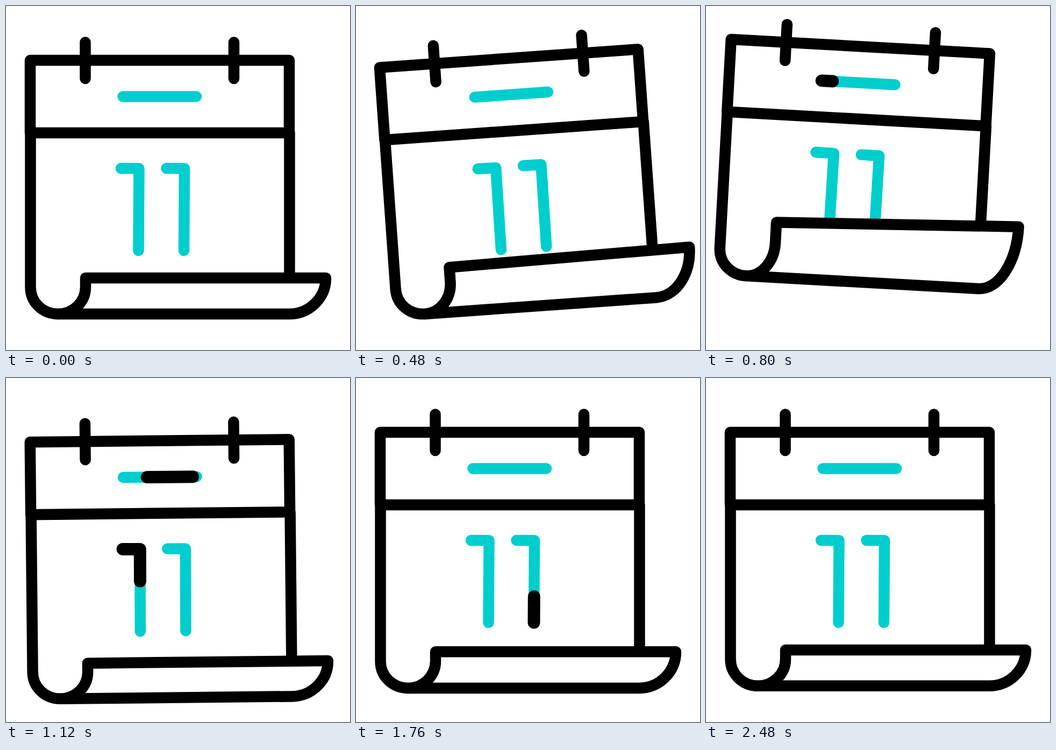
An HTML page for the animation above (2.88 s loop, 640x640 px).

```html
<!DOCTYPE html>
<html lang="en">
<head>
<meta charset="utf-8">
<title>Calendar</title>
<style>
  html, body { margin: 0; width: 100%; height: 100%; overflow: hidden; background: #fff; }
  svg { display: block; width: 100%; height: 100%; }
  path { fill: none; stroke: #000; stroke-width: 20.5; stroke-linecap: round; stroke-linejoin: round; }
  .teal { stroke: #00cece; }
  .pulse { stroke-width: 23; }
  #sheet { fill: #fff; }
</style>
</head>
<body>
<svg viewBox="0 0 640 640">
  <g id="page">
    <path d="M45 236V101H527V236M45 236H527"/>
    <path d="M147.5 67.5V135M424 67.5V135"/>
    <path id="sides"/>
    <g id="marks"></g>
    <path id="sheet"/>
  </g>
</svg>
<script>
const LOOP = 2880, END = 2480, STEP = 40, PULSE = 400;
const $ = id => document.getElementById(id);
const clamp = x => Math.min(1, Math.max(0, x));

// Sine-eased swing from rest through [time, value] turning points.
const swing = (...turns) => t => {
  let time = 0, value = 0;
  for (const [end, next] of turns) {
    const u = clamp((t - time) / (end - time));
    if (u < 1) return value + (next - value) * (1 - Math.cos(Math.PI * u)) / 2;
    time = end;
    value = next;
  }
  return value;
};

const angle = swing([460, -4.1], [890, 4], [1230, -2], [1740, 0]);
const lift = swing([280, 38], [670, -42], [1040, 17], [1500, 0]);
const roll = swing([240, 9], [770, -71], [1120, 7.5], [1450, -53], [1720, 4], [2100, -28], [END, 0]);

const marks = [
  { d: 'M217.5 168.5H354', head: 740, tail: 990 },
  { d: 'M214 302L247.5 302.3L246.5 455', head: 920, tail: 1117 },
  { d: 'M298.5 302L332 302.3L331 455', head: 1232, tail: 1464 }
];

function addPath(d, cls) {
  const p = document.createElementNS('http://www.w3.org/2000/svg', 'path');
  p.setAttribute('d', d);
  p.setAttribute('class', cls);
  p.setAttribute('pathLength', 1);
  return $('marks').appendChild(p);
}
for (const m of marks) {
  addPath(m.d, 'teal');
  m.pulse = addPath(m.d, 'pulse');
}

function drawSheet(t) {
  // The bottom edge trails the top edge and rises half as far.
  const up = roll(t), late = roll(t - 30);
  const drop = late < 0 ? late * .48 : late;
  const low = 573 + drop, top = 506 + up;
  // While the page rocks, the right tip rises further and leans out.
  const tilt = Math.min(0, up) * .24 * clamp((1720 - t) / 600);
  const tip = top + tilt, x = 595 - tilt * .2, edge = x - 68;
  const bend = 523 + .4 * up + .6 * drop;
  const k = .552;

  $('sides').setAttribute('d',
    `M45.5 236V${low - 50}C45.5 ${low - 22} 68 ${low} 97 ${low}M527.5 236V${top}`);
  $('sheet').setAttribute('d',
    `M148 ${top}L${x} ${tip}` +
    `C${x} ${tip + (low - tip) * k} ${edge + 68 * k} ${low} ${edge} ${low}` +
    `H97C${97 + 51 * k} ${low} 148 ${bend + (low - bend) * k} 148 ${bend}Z`);
}

function drawPulse({ pulse, head, tail }, t) {
  const from = clamp((t - tail) / PULSE), to = clamp((t - head) / PULSE);
  pulse.style.display = to > from ? '' : 'none';
  pulse.style.strokeDasharray = `${to - from} 2`;
  pulse.style.strokeDashoffset = -from;
}

function draw(t) {
  $('page').setAttribute('transform', `translate(0 ${lift(t)}) rotate(${angle(t)} 286 125)`);
  drawSheet(t);
  for (const m of marks) drawPulse(m, t);
}

function tick() {
  const t = performance.now() % LOOP;
  draw(Math.min(END, Math.floor(t / STEP) * STEP));
  requestAnimationFrame(tick);
}
tick();
</script>
</body>
</html>
```
